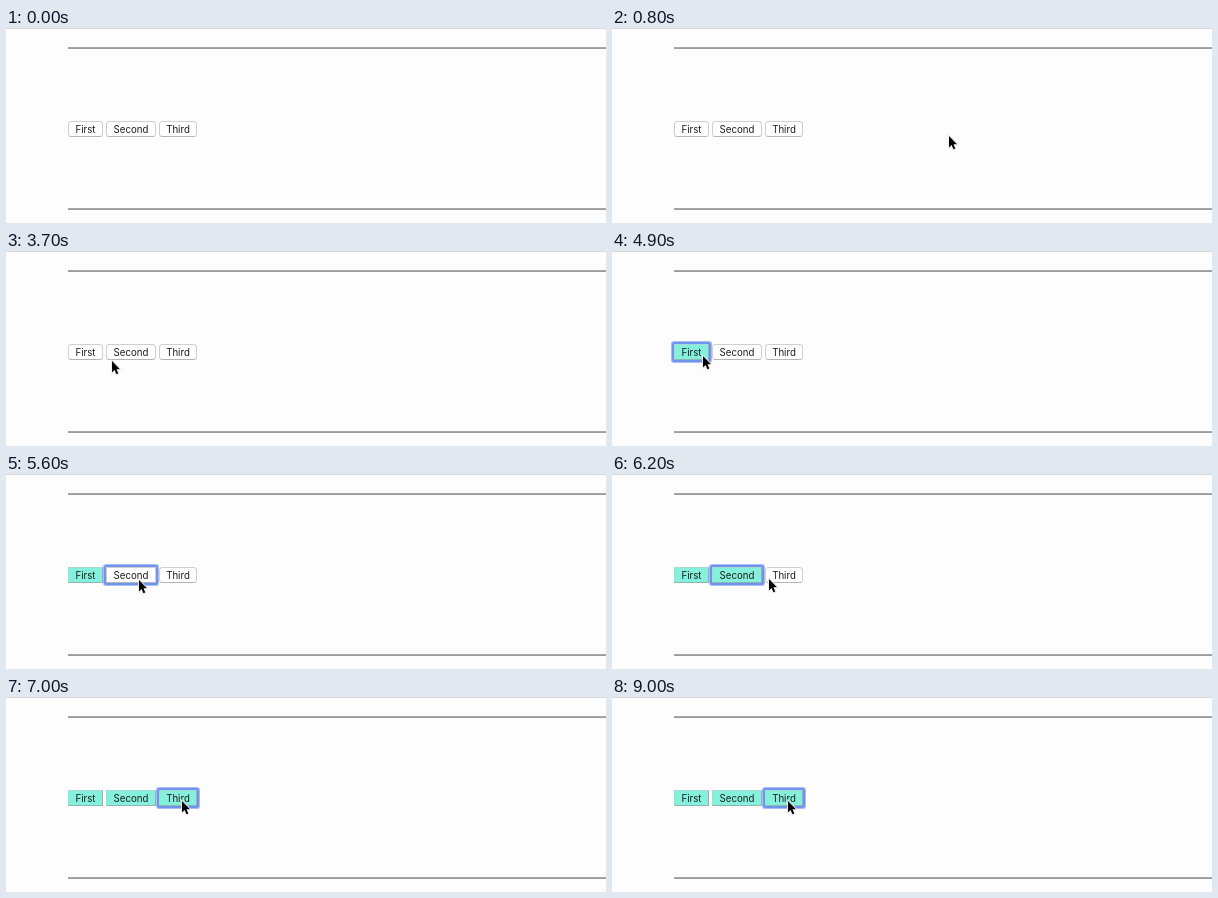
An HTML page for the animation above (9200 ms loop, 600x195 px).

```html
<!DOCTYPE html>
<html lang="en">
<head>
<meta charset="utf-8">
<title>Three buttons</title>
<style>
  html, body { margin: 0; width: 100%; height: 100%; overflow: hidden; background: #fefdfe; }
  #stage { position: relative; width: 600px; height: 195px; overflow: hidden; }
  #stage > * { position: absolute; box-sizing: border-box; }
  .edge { width: 600px; height: 1px; background: #d9d9dc; }
  .rule { left: 62px; width: 538px; height: 2px; background: linear-gradient(#a6a6a8 50%, #9c9c9e 50%); }
  .button {
    top: 93px; height: 16px; line-height: 16px; text-align: center; white-space: nowrap;
    font-family: Inter, "Liberation Sans", sans-serif; font-size: 9.7px; color: #1c1c1c;
    background: #fff; border: 1px solid #cfcfd1; border-bottom-color: #b4b4b6; border-radius: 3.5px;
  }
  .button.on { background: #85f0dc; border-color: #a9d9d2 #8fb5ae #8fb5ae #a9d9d2; border-radius: 0; }
  .button.focus { box-shadow: 0 0 0 2px #6f94f0, 0 0 0 3px #a9bdf6; border-radius: 1px; z-index: 1; }
  #cursor { left: 0; top: 1px; width: 14px; height: 18px; overflow: visible; z-index: 2; filter: drop-shadow(0 .8px .7px rgba(0,0,0,.35)); }
</style>
</head>
<body>
<div id="stage">
  <div class="edge"></div>
  <div class="rule" style="top:19px"></div>
  <div class="button" style="left:62px;width:35px">First</div>
  <div class="button" style="left:100px;width:50px">Second</div>
  <div class="button" style="left:153px;width:38px">Third</div>
  <div class="rule" style="top:180px"></div>
  <svg id="cursor" viewBox="0 0 14 18">
    <path d="M1 1V12.4L3.6 10L5.4 14.2L7.3 13.4L5.5 9.3H9Z" fill="#000" stroke="#fff" stroke-width="1.6" paint-order="stroke"/>
  </svg>
</div>
<script>
  const LOOP = 9200, STEP = 100;

  const easeIn = power => u => u ** power;
  const easeOut = power => u => 1 - (1 - u) ** power;

  // the pointer appears at the entry point, then glides along sagging arcs
  const entry = { time: 500, x: 423, y: 137 };
  const glides = [
    { start: 600, end: 800, x: 336, y: 106, sag: 0, ease: easeOut(1.2) },
    { start: 2900, end: 3100, x: 254, y: 121, sag: -4, ease: easeIn(2.4) },
    { start: 3200, end: 4000, x: 85, y: 101, sag: 12, ease: easeOut(2.2) },
    { start: 4800, end: 5500, x: 132, y: 104, sag: 5, ease: easeIn(1.2) },
    { start: 6000, end: 6600, x: 175, y: 102, sag: 0, ease: easeOut(2) }
  ];

  // a press gives focus, the release one step later fills the button
  const presses = [4500, 5600, 6800];

  const cursor = document.getElementById("cursor");
  const buttons = [...document.querySelectorAll(".button")];
  const begin = performance.now();

  function pointerAt(t) {
    let { x, y } = entry;
    for (const g of glides) {
      if (t <= g.start) break;
      const p = g.ease(Math.min(1, (t - g.start) / (g.end - g.start)));
      x += (g.x - x) * p;
      y += (g.y - y) * p + 4 * g.sag * p * (1 - p);
    }
    return [Math.round(x), Math.round(y)];
  }

  function draw() {
    const elapsed = (performance.now() - begin) % LOOP;
    const t = Math.floor(elapsed / STEP) * STEP;
    const [x, y] = pointerAt(t);
    cursor.style.visibility = t >= entry.time ? "visible" : "hidden";
    cursor.style.transform = `translate(${x}px, ${y}px)`;

    const focused = presses.findLastIndex(press => t >= press);
    buttons.forEach((button, i) => {
      button.classList.toggle("on", t >= presses[i] + STEP);
      button.classList.toggle("focus", i === focused);
    });
    requestAnimationFrame(draw);
  }
  draw();
</script>
</body>
</html>
```
